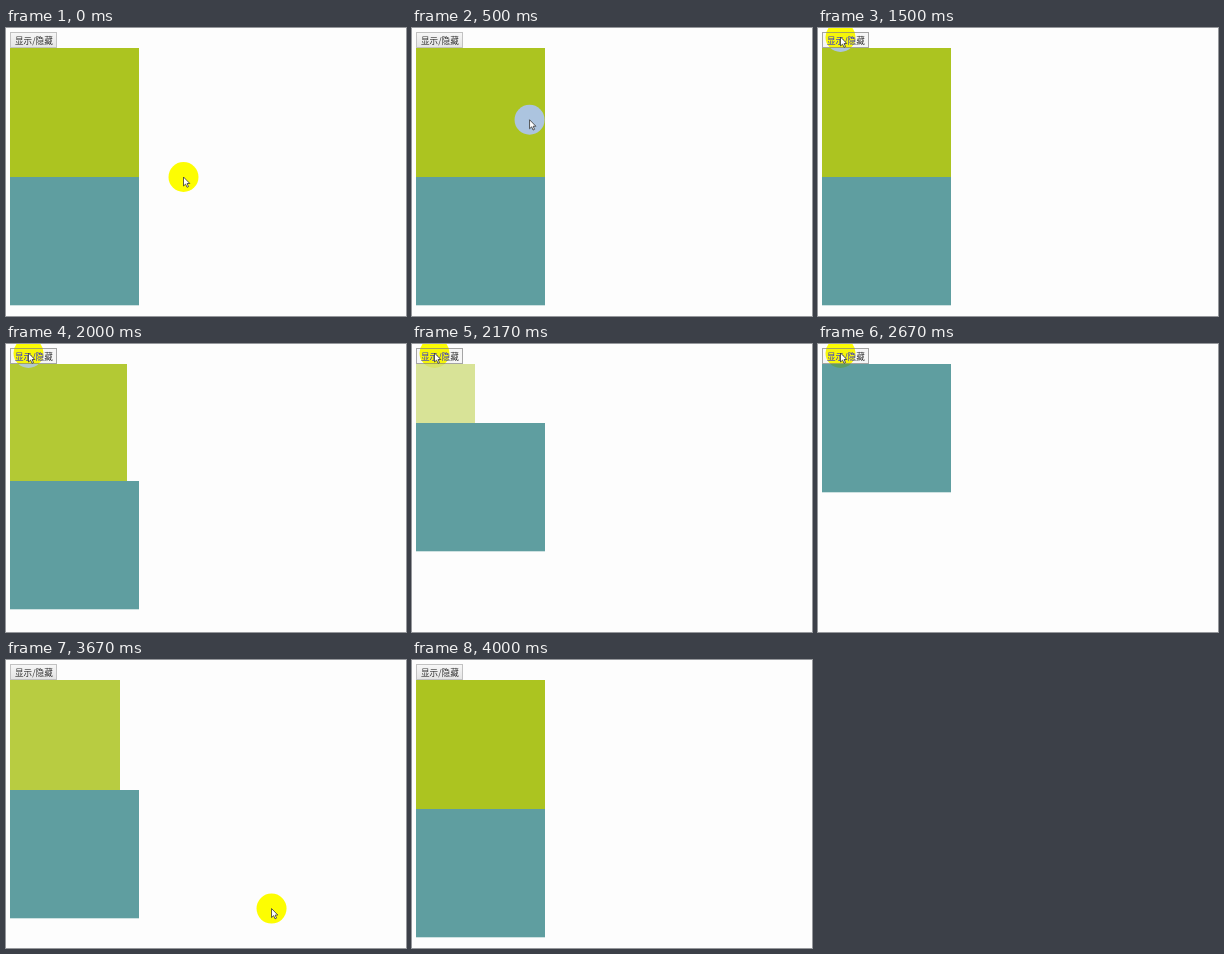
Recreate the animation shown at these times as an HTML page. Size 400x288 px, loop 4.84 s.

```html
<!DOCTYPE html>
<html lang="zh">
<head>
<meta charset="utf-8">
<title>显示/隐藏</title>
<style>
  html, body { margin: 0; width: 100%; height: 100%; overflow: hidden; background: #fdfdfd; }
  svg { display: block; width: 100%; height: 100%; }
  text { font: 8.6px "Noto Sans CJK SC", "Noto Sans CJK", sans-serif; fill: #333; }
  #halo { fill: #00f; mix-blend-mode: difference; }
</style>
</head>
<body>
<svg viewBox="0 0 400 288">
  <defs>
    <linearGradient id="face" x2="0" y2="1">
      <stop stop-color="#f7f7f7"/>
      <stop offset="1" stop-color="#e4e4e4"/>
    </linearGradient>
  </defs>
  <rect width="400" height="288" fill="#fdfdfd"/>
  <rect id="lower" x="4" width="129" height="128.3" fill="#5f9ea0"/>
  <rect id="upper" x="4" y="20" fill="#acc420"/>
  <rect id="button" x="4.5" y="4.5" width="46" height="15"/>
  <text x="9" y="15.7">显示/隐藏</text>
  <g id="pointer">
    <circle id="halo" r="15"/>
    <path id="arrow" d="M0 0V9L2.1 7.1L3.5 10.3L5 9.6L3.6 6.5H6.3Z" fill="#fff" stroke="#333" stroke-width=".8"/>
  </g>
</svg>
<script>
const LOOP = 4840;
const STEP = 1000 / 6; // the picture updates six times a second
const SIDE = 129;
const DURATION = 500;
const HIDE_AT = 1903, SHOW_AT = 3293;
const HOVER_AT = 1160, LEAVE_AT = 3490, GONE_AT = 3830;

// Turning points of the pointer: time, x, y
const path = [
  [0, 177.5, 149], [167, 178.5, 161], [667, 87, 57], [1000, 72.5, 49],
  [1167, 21, 15], [1500, 22.5, 9], [3167, 22.5, 9], [3500, 36.5, 22],
  [3667, 266, 249]
];

const el = id => document.getElementById(id);
const set = (id, attrs) => {
  for (const name in attrs) el(id).setAttribute(name, attrs[name]);
};
const clamp = p => Math.min(1, Math.max(0, p));
const swing = p => .5 - Math.cos(Math.PI * clamp(p)) / 2;

function pointerAt(t) {
  const next = Math.max(1, path.findIndex(point => point[0] >= t));
  const i = t >= path.at(-1)[0] ? path.length - 1 : next;
  const [t0, x0, y0] = path[i - 1];
  const [t1, x1, y1] = path[i];
  const p = clamp((t - t0) / (t1 - t0));
  return [x0 + (x1 - x0) * p, y0 + (y1 - y0) * p];
}

function draw(time) {
  const t = Math.floor((time + 4) / STEP) * STEP;

  const share = 1 - swing((t - HIDE_AT) / DURATION) + swing((t - SHOW_AT) / DURATION);
  const size = Math.round(SIDE * share);
  set("upper", { width: size, height: size, opacity: share });
  set("lower", { y: 20 + size });

  const hover = t >= HOVER_AT && t < LEAVE_AT;
  set("button", { stroke: hover ? "#a5a5a5" : "#c2c2c2", fill: hover ? "#f6f6f6" : "url(#face)" });

  const [x, y] = pointerAt(t);
  const display = t < GONE_AT ? "inline" : "none";
  set("halo", { cx: x, cy: y, display });
  set("arrow", { transform: `translate(${x} ${y})`, display });
}

const begin = performance.now();
function tick() {
  draw((performance.now() - begin) % LOOP);
  requestAnimationFrame(tick);
}
tick();
</script>
</body>
</html>
```
